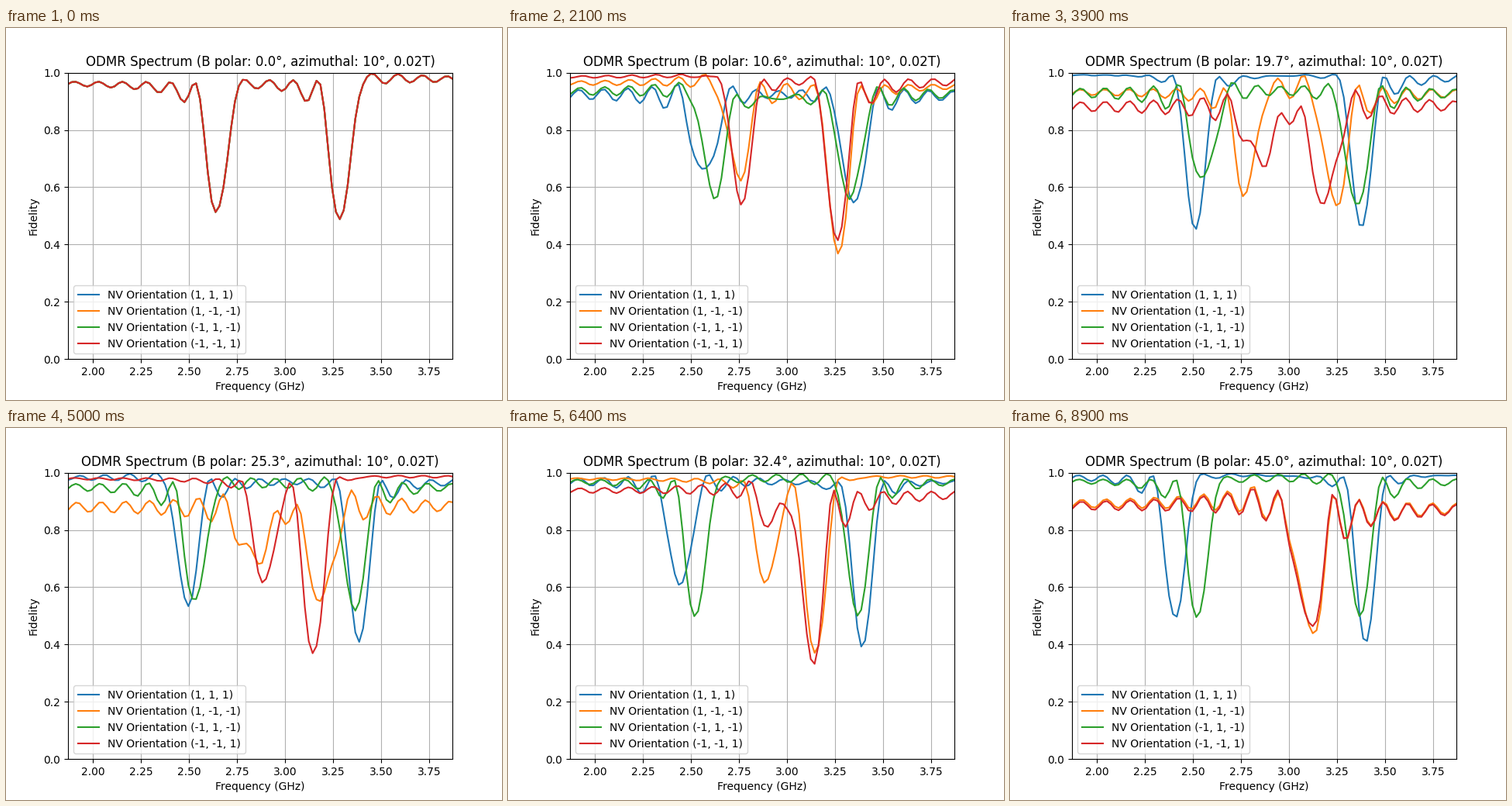
A matplotlib script for the animation above (9 s loop, 640 by 480 pixels).

```python
import numpy as np
import matplotlib.pyplot as plt
from matplotlib.animation import FuncAnimation

# Units: GHz and ns
D = 2.87                    # zero-field splitting
GAMMA = 28.025              # GHz per tesla
B0 = 0.02                   # tesla
AZIMUTH = 10                # degrees
DRIVE = 0.05                # microwave amplitude
PULSE = 1 / (0.04 * np.pi)  # pulse length
STEPS = 640

AXES = [(1, 1, 1), (1, -1, -1), (-1, 1, -1), (-1, -1, 1)]
polars = np.linspace(0, 45, 90)
freqs = np.linspace(D - 1, D + 1, 100)


def field_cosines():
    """|cos| of the angle between the field and each axis, per polar angle."""
    th, ph = np.radians(polars), np.radians(AZIMUTH)
    b = np.stack([np.sin(th) * np.cos(ph), np.sin(th) * np.sin(ph), np.cos(th)], axis=1)
    return np.abs(b @ np.array(AXES).T) / np.sqrt(3)


def simulate(cosines):
    """Population left in the zero state after the pulse, for every frequency."""
    # Basis in which the drive is diagonal; the defect axis lies along X.
    Z = np.diag([1.0, 0.0, -1.0])
    X = np.array([[0, 1, 0], [1, 0, 1], [0, 1, 0]]) / np.sqrt(2)
    zero = np.array([1, 0, -1]) / np.sqrt(2)

    c = cosines.reshape(-1, 1, 1)
    h0 = D * X @ X + GAMMA * B0 * (np.sqrt(1 - c**2) * Z + c * X)
    energy, vec = np.linalg.eigh(h0)

    def free(t):
        phase = np.exp(-2j * np.pi * energy * t)[:, None, :]
        return (vec * phase) @ vec.transpose(0, 2, 1)

    dt = PULSE / STEPS
    whole, half = free(dt), free(dt / 2)
    psi = np.tile(zero.astype(complex), (c.size, freqs.size, 1)) @ half
    for n in range(STEPS):
        t = (n + 0.5) * dt
        kick = np.exp(2j * np.pi * DRIVE * dt * np.sin(2 * np.pi * freqs * t))
        psi[..., 0] *= kick
        psi[..., 2] *= kick.conj()
        psi = psi @ (whole if n < STEPS - 1 else half)
    return (np.abs(psi @ zero) ** 2).reshape(*cosines.shape, freqs.size)


fidelity = simulate(field_cosines())

fig, ax = plt.subplots(figsize=(6.4, 4.8), dpi=100)
lines = [ax.plot(freqs, fidelity[0, k], label=f"NV Orientation {axis}")[0]
         for k, axis in enumerate(AXES)]
ax.set_xlim(freqs[0], freqs[-1])
ax.set_ylim(0, 1)
ax.set_xlabel("Frequency (GHz)")
ax.set_ylabel("Fidelity")
ax.grid(True)
ax.legend(loc="lower left")
title = ax.set_title("")


def draw(i):
    for line, y in zip(lines, fidelity[i]):
        line.set_ydata(y)
    title.set_text(f"ODMR Spectrum (B polar: {polars[i]:.1f}°, azimuthal: {AZIMUTH}°, {B0}T)")
    return [*lines, title]


anim = FuncAnimation(fig, draw, frames=len(polars), interval=100, repeat=True)
plt.show()
```
